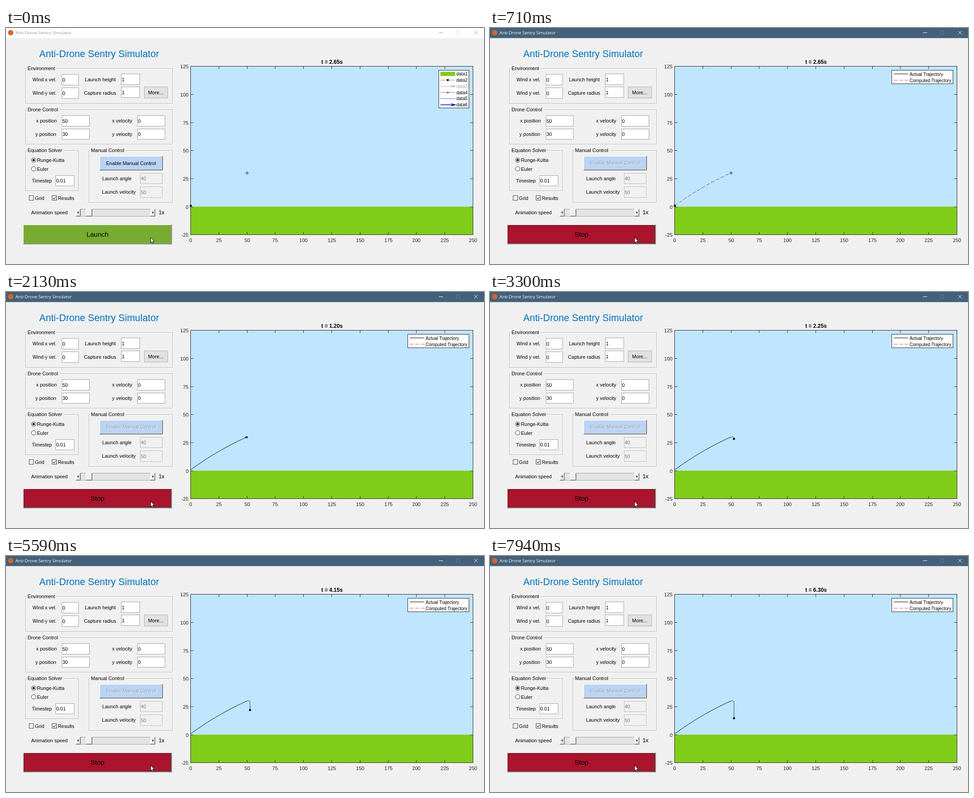
Write an HTML page that moves like this. It is 1063 by 527 pixels and loops after 8 s.

```html
<!DOCTYPE html>
<html lang="en">
<head>
<meta charset="utf-8">
<title>Anti-Drone Sentry Simulator</title>
<style>
html, body { margin: 0; width: 100%; height: 100%; overflow: hidden; background: #f0f0f0; }
svg { display: block; font-family: "Liberation Sans", Arial, sans-serif; }
text { white-space: pre; }
</style>
</head>
<body>
<svg id="stage" width="1063" height="527" viewBox="0 0 1063 527"></svg>
<script>
const INK = '#262626';

// --- drawing helpers; text is centred vertically on cy, with a whole-pixel baseline ---
const text = (x, cy, str, size = 10.9, attrs = '') =>
  `<text x="${x}" y="${Math.round(cy + size * 0.36)}" font-size="${size}" ${attrs}>${str}</text>`;
const rect = (x1, y1, x2, y2, fill, attrs = '') =>
  `<rect x="${x1}" y="${y1}" width="${x2 - x1}" height="${y2 - y1}" fill="${fill}" ${attrs}/>`;
const path = (d, stroke, attrs = '') => `<path d="${d}" fill="none" stroke="${stroke}" ${attrs}/>`;
const dot = (x, y, r, fill, attrs = '') => `<circle cx="${x}" cy="${y}" r="${r}" fill="${fill}" ${attrs}/>`;
const group = (id, content) => `<g id="${id}">${content}</g>`;
const MIDDLE = 'text-anchor="middle"', END = 'text-anchor="end"';

const bevel = (x1, y1, x2, y2, fill) =>
  rect(x1, y1, x2, y2, fill) +
  path(`M${x1 + .5} ${y2}V${y1 + .5}H${x2}`, '#fff') +
  path(`M${x1 + 1} ${y2 - 1.5}H${x2 - 1.5}V${y1 + 1}`, '#a0a0a0') +
  path(`M${x1} ${y2 - .5}H${x2 - .5}V${y1}`, '#696969');

function panel(x1, y1, x2, y2, title, gapEnd) {
  const outline = (o, color) => path(
    `M${x1 + 3 + o} ${y1 + o}H${x1 + o}V${y2 + o}H${x2 + o}V${y1 + o}H${gapEnd}`, color);
  return outline(1, '#fff') + outline(0, '#b4b4b4') + text(x1 + 4.5, y1 - .5, title);
}
function field(x1, y1, x2, y2, value, disabled) {
  return rect(x1 + .5, y1 + .5, x2 - .5, y2 - .5, disabled ? '#f0f0f0' : '#fff',
      `stroke="${disabled ? '#bcbcbc' : '#a0a0a0'}"`) +
    text(x1 + 1.5, (y1 + y2) / 2 + .5, value, 10.9, disabled ? 'fill="#777"' : '');
}
function checkbox(x, label, checked) {
  return rect(x + .5, 374.5, x + 10.5, 384.5, '#fff', 'stroke="#333"') +
    (checked ? path(`M${x + 2.5} 379.5l2.3 2.5l4-5`, '#222', 'stroke-width="1.2"') : '') +
    text(x + 13.5, 380.5, label);
}
function radio(y, label, checked) {
  return dot(61.5, y, 5, '#fff', 'stroke="#333"') + (checked ? dot(61.5, y, 2.8, '#222') : '') +
    text(69, y + .5, label);
}

// --- window parts ---
function titleBar(id, back, ink, dim) {
  return group(id, rect(0, 0, 1063, 22.5, back) +
    dot(10.5, 10.5, 6, '#d9622b') +
    text(21, 10.5, 'Anti-Drone Sentry Simulator', 9.55, `fill="${ink}" font-family="Open Sans, sans-serif"`) +
    path('M963 10.5h9', ink) + path('M1002 6.5h7v7h-7z', dim) +
    path('M1041 6.5l8 8m0-8l-8 8', ink));
}

function controls() {
  const labels = [
    [59, 115, 'Wind x vel.'], [59, 145, 'Wind y vel.'], [175.5, 115, 'Launch height'],
    [173.5, 145, 'Capture radius'], [67, 207, 'x position'], [65.5, 237.5, 'y position'],
    [236, 207, 'x velocity'], [236, 237.5, 'y velocity'], [57.5, 341, 'Timestep'],
    [214, 336, 'Launch angle'], [213.5, 366, 'Launch velocity'], [56, 412.5, 'Animation speed']];
  const fields = [
    [124, 103, 162, 128, '0'], [124, 133, 162, 158, '0'], [256, 102, 298, 127, '1'],
    [256, 131, 298, 156, '1'], [124, 195, 186, 220, '50'], [124, 225, 186, 249, '30'],
    [292, 195, 354, 220, '0'], [292, 225, 354, 249, '0'], [110, 329, 152, 353, '0.01'],
    [298, 324, 348, 348, '40', true], [298, 354, 348, 379, '50', true]];
  return text(74, 57.5, 'Anti-Drone Sentry Simulator', 21.4, 'fill="#0072bd"') +
    panel(43.5, 90.5, 370.5, 168.5, 'Environment', 112) +
    panel(43.5, 182.5, 370.5, 259.5, 'Drone Control', 120) +
    panel(43.5, 273.5, 161.5, 363.5, 'Equation Solver', 127) +
    panel(184.5, 273.5, 370.5, 389.5, 'Manual Control', 265) +
    labels.map(l => text(...l)).join('') + fields.map(f => field(...f)).join('') +
    rect(307.5, 131.5, 359.5, 156.5, '#e1e1e1', 'stroke="#adadad"') + text(333, 144, 'More...', 10.9, MIDDLE) +
    radio(295, 'Runge-Kutta', true) + radio(314.5, 'Euler') +
    checkbox(51, 'Grid') + checkbox(102, 'Results', true) +
    bevel(208, 286, 349, 318, '#b9d4f4') +
    group('manualOn', text(278, 302, 'Enable Manual Control', 10.9, MIDDLE)) +
    group('manualOff', text(279, 302.5, 'Enable Manual Control', 10.9, MIDDLE + ' fill="#fff"') +
      text(278, 301.5, 'Enable Manual Control', 10.9, MIDDLE + ' fill="#8b97a8"')) +
    rect(155, 404, 332, 421, '#e3e3e3') + path('M155 404.5H332M155 420.5H332', '#a5a5a5') +
    bevel(155, 404, 166, 421, '#f0f0f0') + bevel(321, 404, 332, 421, '#f0f0f0') +
    bevel(178, 404, 192, 421, '#f0f0f0') +
    '<path d="M161.5 409.5v5l-3-2.5zM325.5 409.5v5l3-2.5z"/>' +
    text(339.5, 411.5, '1x', 12.3);
}

function bigButton(id, label, fill, frame, shift = 0) {
  return group(id, bevel(38, 439, 369, 483, fill) +
    (frame ? rect(39.5, 440.5, 366.5, 480.5, 'none', `stroke="${frame}"`) : '') +
    text(203.5 + shift, 460.5 + shift, label, 15, MIDDLE));
}

function axes() {
  const crisp = v => Math.floor(v) + .5;
  let marks = '', labels = '';
  for (let i = 0; i <= 10; i++) {
    const x = crisp(410.5 + i * 62.8);
    marks += `M${x} 461.5v-6M${x} 85.5v6`;
    labels += text(x, 474, i * 25, 11.2, `${MIDDLE} fill="${INK}"`);
  }
  for (let i = 0; i <= 6; i++) {
    const y = crisp(461.8 - i * 62.7);
    marks += `M410.5 ${y}h6M1038.5 ${y}h-6`;
    labels += text(406, y, i * 25 - 25, 11.2, `${END} fill="${INK}"`);
  }
  return rect(410.5, 85.5, 1038.5, 461.5, '#bfe5ff') + rect(410.5, 399, 1038.5, 461.5, '#80cd1a') +
    path('M410.5 85.5H1038.5V461.5H410.5Z' + marks, INK) + labels;
}

function legends() {
  const rowY = i => 102.5 + i * 13.8;
  const line = (y, color, attrs) => path(`M966 ${y}h33`, color, attrs);
  const arrow = (y, color, width) => line(y, color, `stroke-width="${width}"`) +
    path(`M990 ${y - 2.5}l9 2.5l-9 2.5`, color, `stroke-width="${width}"`);
  const samples = [
    rect(966, 98, 999, 107, '#80cd1a'),
    line(rowY(1), '#c07a30') + dot(982.5, rowY(1), 2.3, '#000'),
    arrow(rowY(2), '#a8a8a8', 1),
    line(rowY(3), '#777') + dot(982.5, rowY(3), 1.5, '#00c'),
    line(rowY(4), '#5a5aff'),
    arrow(rowY(5), '#00c', 1.4)];
  return group('legendIdle', rect(962.5, 94.5, 1029.5, 178.5, '#fff', `stroke="${INK}"`) +
      samples.map((s, i) => s + text(1001.5, rowY(i), 'data' + (i + 1), 10, i === 2 ? 'fill="#aaa"' : '')).join('')) +
    group('legendRun', rect(893.5, 94.5, 1029.5, 124.5, '#fff', `stroke="${INK}"`) +
      path('M898 102.5h32', '#000') + text(933, 103.5, 'Actual Trajectory', 10) +
      path('M898 116.5h32', '#d9504c', 'stroke-dasharray="8 4"') + text(933, 117, 'Computed Trajectory', 10));
}

// --- flight model, in stage pixels against simulated seconds ---
const CAPTURE = 1.2;
function position(t) {
  if (t < CAPTURE) {
    const x = 113 * t - 8 * t * t, p = x / 124;
    return [410.8 + x, 397 - 72.7 * p - 17.6 * p * (1 - p)];
  }
  const u = t - CAPTURE, slowed = 1 - Math.exp(-3.6 * u);
  return [535 + 7.7 * slowed, 324.3 + 8.5 * u - 5.35 * slowed];
}
function trajectory(end) {
  const points = [];
  for (let t = 0; t < end; t += 0.02) points.push(position(t));
  points.push(position(end));
  return 'M' + points.map(p => p.map(v => v.toFixed(2)).join(' ')).join('L');
}

// --- timing: bursts of picture updates [start, end, updates] ---
const BURSTS = [[710, 1460, 13], [1530, 2320, 13], [2380, 3180, 13], [3240, 4010, 13], [4080, 4880, 14],
  [4940, 5720, 13], [5780, 6550, 13], [6600, 7360, 13], [7430, 7940, 9]];
function updateIndex(ms) {
  let index = 0, before = 0;
  for (const [start, end, n] of BURSTS) {
    if (ms < start) break;
    index = before + Math.min(n - 1, Math.floor((ms - start) / (end - start) * (n - 1) + 0.1));
    before += n;
  }
  return index;
}
// Simulated seconds at given updates; the clock advances in steps of 0.05.
const CLOCK = [[0, 0], [1, .1], [12, .65], [22, 1.2], [40, 2.25], [60, 3.25], [92, 5.05], [113, 6.3]];
function simTime(index) {
  const k = Math.max(1, CLOCK.findIndex(c => c[0] >= index));
  const [i0, t0] = CLOCK[k - 1], [i1, t1] = CLOCK[k];
  return Math.round((t0 + (t1 - t0) * (index - i0) / (i1 - i0)) * 20) / 20;
}

// --- scene ---
const stage = document.getElementById('stage');
stage.innerHTML = rect(0, 0, 1063, 527, '#f0f0f0') +
  titleBar('barIdle', '#fff', '#999', '#ddd') +
  titleBar('barActive', '#43617a', '#fff', '#6d8598') +
  controls() +
  bigButton('launch', 'Launch', '#77ac30') +
  bigButton('pressed', 'Launch', '#77ac30', '#3c5618', 1) +
  bigButton('focused', 'Launch', '#77ac30', '#3c5618') +
  bigButton('stop', 'Stop', '#aa142d', '#5a0a18') +
  axes() + legends() +
  text(725, 76, '', 12, `id="clock" font-weight="bold" ${MIDDLE}`) +
  path(trajectory(CAPTURE), '#a2283a', 'id="computed" stroke-dasharray="8 4"') +
  group('drone', dot(536.2, 323.8, 2.5, 'none', 'stroke="#1b2be0"') + dot(536.2, 323.8, 1, '#223')) +
  path('', '#000', 'id="actual"') + dot(0, 0, 2.4, '#000', 'id="ball"') +
  '<path d="M321.5 467.5v12l2.7-2.5l1.9 4.2l1.8-.8l-1.8-4.1h3.7z" fill="#fff" stroke="#000" stroke-width=".9"/>';
const el = id => document.getElementById(id);
const show = (id, on) => el(id).setAttribute('display', on ? 'inline' : 'none');

function draw(ms) {
  const running = ms >= 710, t = running ? simTime(updateIndex(ms)) : 0;
  const [x, y] = position(t);
  show('barIdle', ms < 130);
  show('barActive', ms >= 130);
  show('launch', ms < 250);
  show('pressed', ms >= 250 && ms < 520);
  show('focused', ms >= 520 && !running);
  show('stop', running);
  for (const id of ['manualOn', 'legendIdle']) show(id, !running);
  for (const id of ['manualOff', 'legendRun']) show(id, running);
  show('computed', running && t < CAPTURE);
  show('drone', t < CAPTURE);
  el('actual').setAttribute('d', t > 0 ? trajectory(t) : '');
  el('ball').setAttribute('cx', x);
  el('ball').setAttribute('cy', y);
  el('clock').textContent = `t = ${(t || 2.65).toFixed(2)}s`;
}

const began = performance.now();
function tick() {
  draw((performance.now() - began) % 8000);
  requestAnimationFrame(tick);
}
tick();
</script>
</body>
</html>
```
